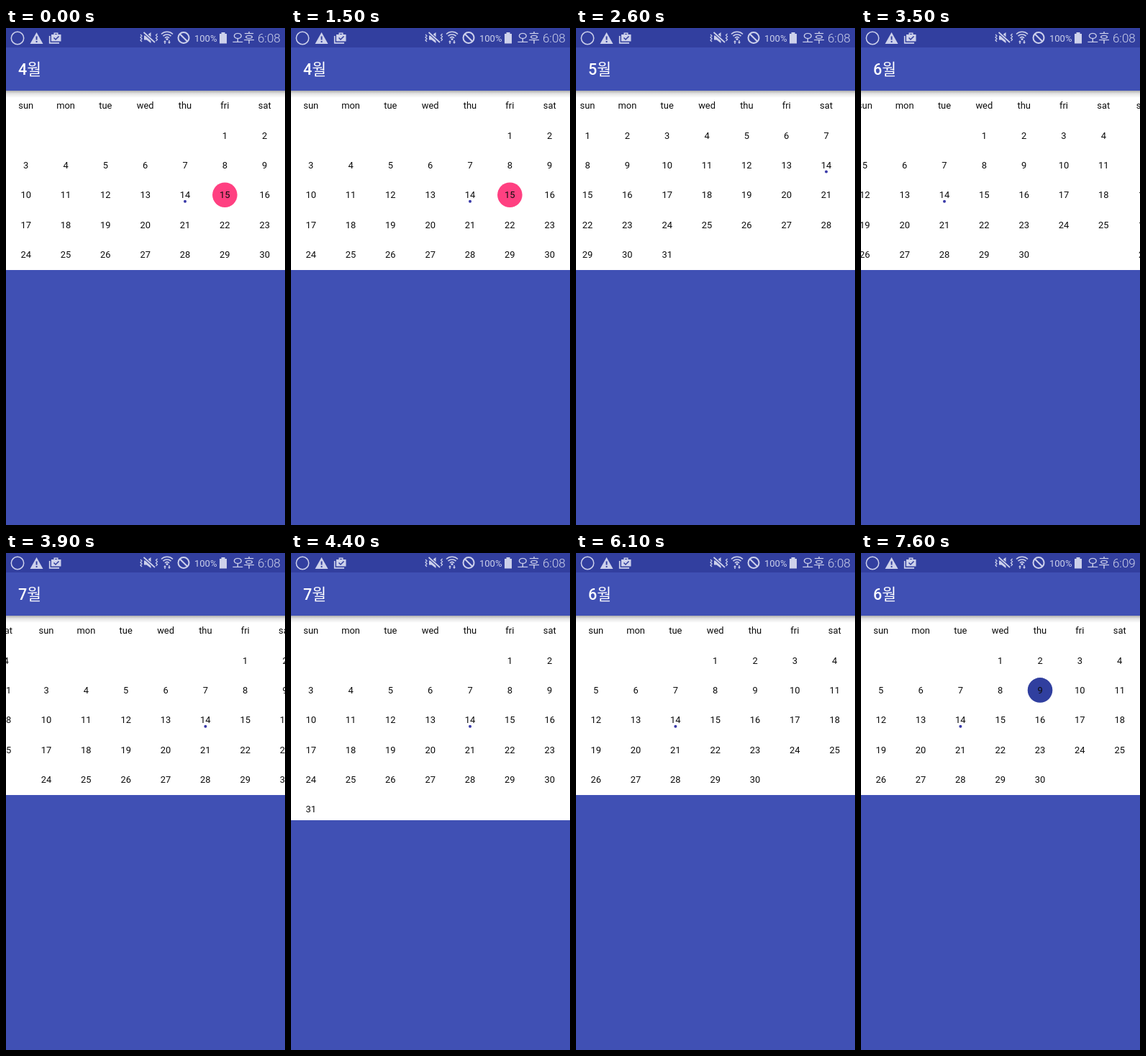
Animation of 388 by 690 pixels, one loop 7.7 s. Source, as an HTML page:

```html
<!DOCTYPE html>
<html lang="ko">
<head>
<meta charset="utf-8">
<title>Calendar</title>
<style>
  html, body { margin: 0; height: 100%; overflow: hidden; background: #4050b4; }
  svg { display: block; font-family: Roboto, "Noto Sans CJK KR", "Noto Sans CJK", sans-serif; }
  .days { font-size: 12.9px; text-anchor: middle; fill: #0c0c0c; }
  .title { font-size: 21.5px; font-weight: 500; fill: #fff; }
  .status { fill: #cdd1eb; }
  .line { fill: none; stroke: #cdd1eb; }
</style>
</head>
<body>
<svg id="stage" width="388" height="690" viewBox="0 0 388 690">
  <defs>
    <linearGradient id="shade" x2="0" y2="1">
      <stop offset="0" stop-color="#000" stop-opacity=".32"/>
      <stop offset=".4" stop-color="#000" stop-opacity=".11"/>
      <stop offset="1" stop-color="#000" stop-opacity="0"/>
    </linearGradient>
  </defs>
  <rect width="388" height="690" fill="#4050b4"/>

  <svg id="sheet" y="87" width="388" height="249">
    <rect width="388" height="300" fill="#fff"/>
    <g id="pager" class="days"></g>
    <rect width="388" height="10" fill="url(#shade)"/>
  </svg>

  <rect width="388" height="27" fill="#323f9f"/>
  <text id="title" class="title" x="17" y="65"></text>

  <g class="status">
    <path d="M42.5 6 51.5 22h-18z"/>
    <path d="M41.6 11.5h1.9v5h-1.9zM41.6 18h1.9v2h-1.9z" fill="#323f9f"/>
    <path d="M63 9h3.500v-2.500h6v2.500h4v9.500h-13.500zM68 8v1h3v-1z" fill-rule="evenodd"/>
    <path d="M66.500 13.500l2.500 2.500 4.500-4.500" fill="none" stroke="#323f9f" stroke-width="1.500"/>
    <path d="M192 10.500h3.500l6-4.500v15l-6-4.500h-3.500z"/>
    <path d="M297 8h2.500v-2h5v2h2.500v13.500h-10z"/>
    <circle cx="224" cy="15.500" r="1.500"/>
    <path d="M221 17l2 2.500h-1.300v2.500h-1.400v-2.500h-1.300zM227 22l-2-2.500h1.300v-2.500h1.400v2.500h1.300z"/>
    <text x="262" y="18.500" font-size="13">100%</text>
    <text id="clock" x="314.500" y="19.700" font-size="17" font-weight="300"></text>
  </g>
  <g class="line" stroke-width="1.500">
    <circle cx="16" cy="14" r="8.700"/>
    <path d="M60.700 11v9.800h13.300" stroke-width="1.700"/>
    <path d="M192 6.500 207 20" stroke="#323f9f" stroke-width="4"/>
    <path d="M191.500 6 207 20" stroke-width="1.700"/>
    <path d="M187 9l2 2-2 2 2 2-2 2 2 2M210.500 8l-2 2 2 2-2 2 2 2-2 2" stroke-width="1.200"/>
    <path d="M216 8.500a11.500 11.500 0 0 1 16 0M218.500 11.200a8 8 0 0 1 11 0M221 13.800a4.500 4.500 0 0 1 6 0" stroke-width="1.700"/>
    <circle cx="247" cy="13.500" r="7.500" stroke-width="2"/>
    <path d="M241.700 8.200l10.600 10.600" stroke-width="2"/>
  </g>
</svg>

<script>
const LOOP = 7700, WIDTH = 388, FIRST_MONTH = 4;
const WEEKDAYS = ["sun", "mon", "tue", "wed", "thu", "fri", "sat"];
const SWIPES = [[1650, 1], [2539, 1], [3415, 1], [4994, -1]];
const $ = id => document.getElementById(id);
const clamp = v => Math.max(0, Math.min(1, v));

function add(parent, tag, attrs, text = "") {
  const node = document.createElementNS("http://www.w3.org/2000/svg", tag);
  for (const key in attrs) node.setAttribute(key, attrs[key]);
  node.textContent = text;
  return parent.appendChild(node);
}

const cellX = col => 27.7 + col * 55.33;
const cellY = row => 20.7 + row * 41.35;

function buildMonth(index) {
  const month = FIRST_MONTH + index;
  const page = add($("pager"), "g", { transform: `translate(${index * WIDTH})` });
  const first = new Date(2016, month - 1, 1).getDay();
  const count = new Date(2016, month, 0).getDate();
  const label = (col, row, text) => add(page, "text", { x: cellX(col), y: cellY(row) + 4.6 }, text);
  const circle = (col, row, r, fill, dy = 0) =>
    add(page, "circle", { cx: cellX(col), cy: cellY(row) + dy, r, fill });

  WEEKDAYS.forEach((name, col) => label(col, 0, name));
  for (let day = 1; day <= count; day++) {
    const slot = first + day - 1, col = slot % 7, row = 1 + Math.floor(slot / 7);
    if (month === 4 && day === 15) circle(col, row, 17.3, "#ff4081");
    if (month === 6 && day === 9) circle(col, row, 17.3, "#303f9f").id = "picked";
    if (day === 14) circle(col, row, 2, "#3a3aa8", 9.1);
    label(col, row, day);
  }
}
for (let i = 0; i < 4; i++) buildMonth(i);

// Drag start followed by a decelerating fling
const swipe = u => 1 - (1 - clamp(u) ** 2) ** 4;

function render(t) {
  const position = SWIPES.reduce((sum, [start, step]) => sum + step * swipe((t - start) / 700), 0);
  const sixthRow = clamp((t - 4150) / 300) - clamp((t - 5680) / 300);

  $("pager").setAttribute("transform", `translate(${-position * WIDTH})`);
  $("sheet").setAttribute("height", 249 + 42 * sixthRow);
  $("title").textContent = FIRST_MONTH + Math.round(position) + "월";
  $("clock").textContent = t < 6900 ? "오후 6:08" : "오후 6:09";
  $("picked").setAttribute("visibility", t < 7000 ? "hidden" : "visible");
}

// The screen updates ten times a second
function tick() {
  render(Math.floor(performance.now() % LOOP / 100) * 100);
  requestAnimationFrame(tick);
}
tick();
</script>
</body>
</html>
```
